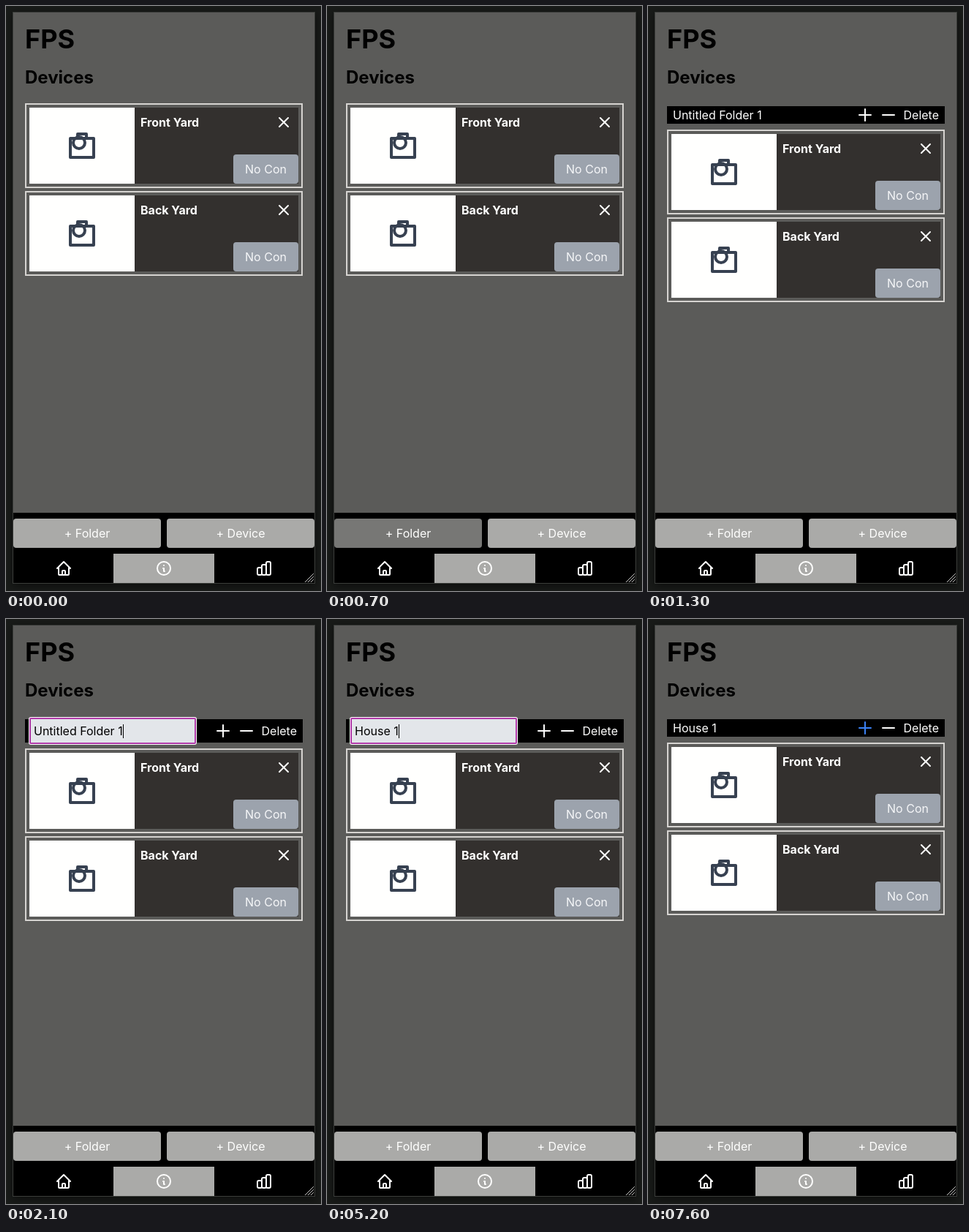
An HTML page for the animation above (8000 ms loop, 431 by 800 pixels).

```html
<!DOCTYPE html>
<html lang="en">
<head>
<meta charset="utf-8">
<title>Devices</title>
<style>
  html, body { margin: 0; width: 100%; height: 100%; overflow: hidden; background: #191b19; }
  svg { display: block; width: 431px; height: 800px; font: 400 16px Inter, sans-serif; }
  text { white-space: pre; }
  .bold { font-weight: 700; }
  .mid { text-anchor: middle; }
  .end { text-anchor: end; }
  .icon { fill: none; stroke: #fffffe; stroke-width: 2; stroke-linecap: round; stroke-linejoin: round; }
  .camera { stroke: #374151; stroke-width: 4; }
  .panel { filter: drop-shadow(0 3px 6px rgba(0, 0, 0, .5)); }
</style>
</head>
<body>
<svg viewBox="0 0 431 800">
  <defs>
    <g id="card">
      <rect x="27" y="1" width="378" height="114" fill="none" stroke="#d6d4d1" stroke-width="2"/>
      <rect x="32" y="6" width="368" height="104" fill="#33302e"/>
      <rect x="32" y="6" width="144" height="104" fill="#fffffe"/>
      <g class="icon camera">
        <rect x="88" y="48" width="32" height="26"/>
        <path d="M98 47V42H110V47"/>
        <circle cx="100" cy="54" r="8"/>
      </g>
      <path class="icon" d="M374 20L386 32M386 20L374 32"/>
      <rect x="311" y="70" width="89" height="40" rx="4" fill="#9ca3ad"/>
      <text class="mid" x="355.5" y="96" fill="#f5f6f8">No Con</text>
    </g>
  </defs>

  <rect width="431" height="800" fill="#191b19"/>
  <rect class="panel" x="9" y="8" width="414" height="782" fill="#3c3e3b"/>
  <rect x="10" y="9" width="412" height="684" fill="#5b5b59"/>
  <text class="bold" x="26" y="58" font-size="36">FPS</text>
  <text class="bold" x="26" y="106" font-size="24">Devices</text>

  <g id="folder">
    <rect id="bar" x="26" y="137" width="380" height="24"/>
    <text id="label" x="34" y="155" fill="#fffffe"></text>
    <g id="tools">
      <path id="plus" class="icon" d="M289 149H305M297 141V157"/>
      <path class="icon" d="M321 149H337"/>
      <text class="end" x="398" y="155" fill="#fffffe">Delete</text>
    </g>
    <g id="editor">
      <rect x="31" y="134" width="230" height="38" rx="3" fill="#fffffe"/>
      <rect x="32" y="135" width="228" height="36" rx="2" fill="#b03aa9"/>
      <rect x="34" y="137" width="224" height="32" fill="#e3e6ea"/>
      <rect id="mark" y="144" height="19" fill="#b03aa9"/>
      <text x="38" y="159"><tspan id="plain"></tspan><tspan id="picked" fill="#fff"></tspan></text>
      <rect id="caret" y="144" width="1" height="19"/>
    </g>
  </g>

  <g id="list">
    <use href="#card"/>
    <text class="bold" x="184" y="32" fill="#fffffe">Front Yard</text>
    <use href="#card" y="120"/>
    <text class="bold" x="184" y="152" fill="#fffffe">Back Yard</text>
  </g>

  <rect x="10" y="693" width="412" height="96"/>
  <rect id="addFolder" x="10" y="701" width="202" height="40" rx="4"/>
  <rect id="addDevice" x="220" y="701" width="202" height="40" rx="4"/>
  <g class="mid" fill="#fffffe">
    <text x="111" y="727">+ Folder</text>
    <text x="321" y="727">+ Device</text>
  </g>
  <rect x="147" y="749" width="138" height="40" fill="#aaaaa8"/>
  <g class="icon">
    <path transform="translate(67 757)" d="M3 12l2-2m0 0l7-7 7 7M5 10v10a1 1 0 001 1h3m10-11l2 2m-2-2v10a1 1 0 01-1 1h-3m-6 0a1 1 0 001-1v-4a1 1 0 011-1h2a1 1 0 011 1v4a1 1 0 001 1m-6 0h6"/>
    <path transform="translate(204 757)" d="M13 16h-1v-4h-1m1-4h.01M21 12a9 9 0 11-18 0 9 9 0 0118 0z"/>
    <path transform="translate(341 757)" d="M9 19v-6a2 2 0 00-2-2H5a2 2 0 00-2 2v6a2 2 0 002 2h2a2 2 0 002-2zm0 0V9a2 2 0 012-2h2a2 2 0 012 2v10m-6 0a2 2 0 002 2h2a2 2 0 002-2m0 0V5a2 2 0 012-2h2a2 2 0 012 2v14a2 2 0 01-2 2h-2a2 2 0 01-2-2z"/>
  </g>
  <path d="M409 788L421 776M413 788L421 780M417 788L421 784" stroke="#c4c4c2" fill="none"/>
</svg>
<script>
const LOOP = 8000, TICK = 100;
const UNTITLED = 'Untitled Folder 1', NAMED = 'House 1';
const EDIT = [2100, 5800];
const KEYS = [4000, 4200, 4300, 4500, 4700, 4900, 5100];
const $ = id => document.getElementById(id);
const show = (id, on) => $(id).setAttribute('display', on ? 'inline' : 'none');
const shiftY = (id, y) => $(id).setAttribute('transform', `translate(0 ${y})`);

const ease = (t, start, span) => {
  const p = Math.min(1, Math.max(0, (t - start) / span));
  return p * p * (3 - 2 * p);
};

function tint(id, amount) {
  const v = Math.round(170 - 51 * amount);
  $(id).setAttribute('fill', `rgb(${v},${v},${v - 2})`);
}

function drawEditor(t) {
  const typed = KEYS.filter(k => t >= k).length;
  const text = typed ? NAMED.slice(0, typed) : UNTITLED;
  const from = typed || t < 2900 ? text.length : t < 3200 ? text.length - 1 : 0;
  $('plain').textContent = text.slice(0, from);
  $('picked').textContent = text.slice(from);
  const left = Math.round(38 + (from ? $('plain').getComputedTextLength() : 0));
  const selected = from < text.length;
  show('mark', selected);
  show('caret', !selected);
  $('caret').setAttribute('x', left);
  if (selected) {
    $('mark').setAttribute('x', left);
    $('mark').setAttribute('width', Math.round($('picked').getComputedTextLength()));
  }
}

function render(time) {
  const t = Math.floor(time / TICK) * TICK;
  const open = t >= 800, editing = t >= EDIT[0] && t < EDIT[1];

  // pointer crosses the right button, then rests on the left one
  tint('addDevice', 0.5 * (ease(t, 130, 170) - ease(t, 300, 200)));
  tint('addFolder', ease(t, 350, 350) - ease(t, 950, 350));

  show('folder', open);
  show('editor', editing);
  show('label', !editing);
  $('label').textContent = t < EDIT[1] ? UNTITLED : NAMED;
  $('bar').setAttribute('height', editing ? 32 : 24);
  shiftY('tools', editing ? 4 : 0);
  shiftY('list', editing ? 177 : open ? 169 : 133);
  $('plus').style.stroke = t >= 7600 ? '#3b82f6' : '';
  if (editing) drawEditor(t);
}

const begin = performance.now();
function loop(now) {
  render(Math.max(0, now - begin) % LOOP);
  requestAnimationFrame(loop);
}
render(0);
requestAnimationFrame(loop);
</script>
</body>
</html>
```
